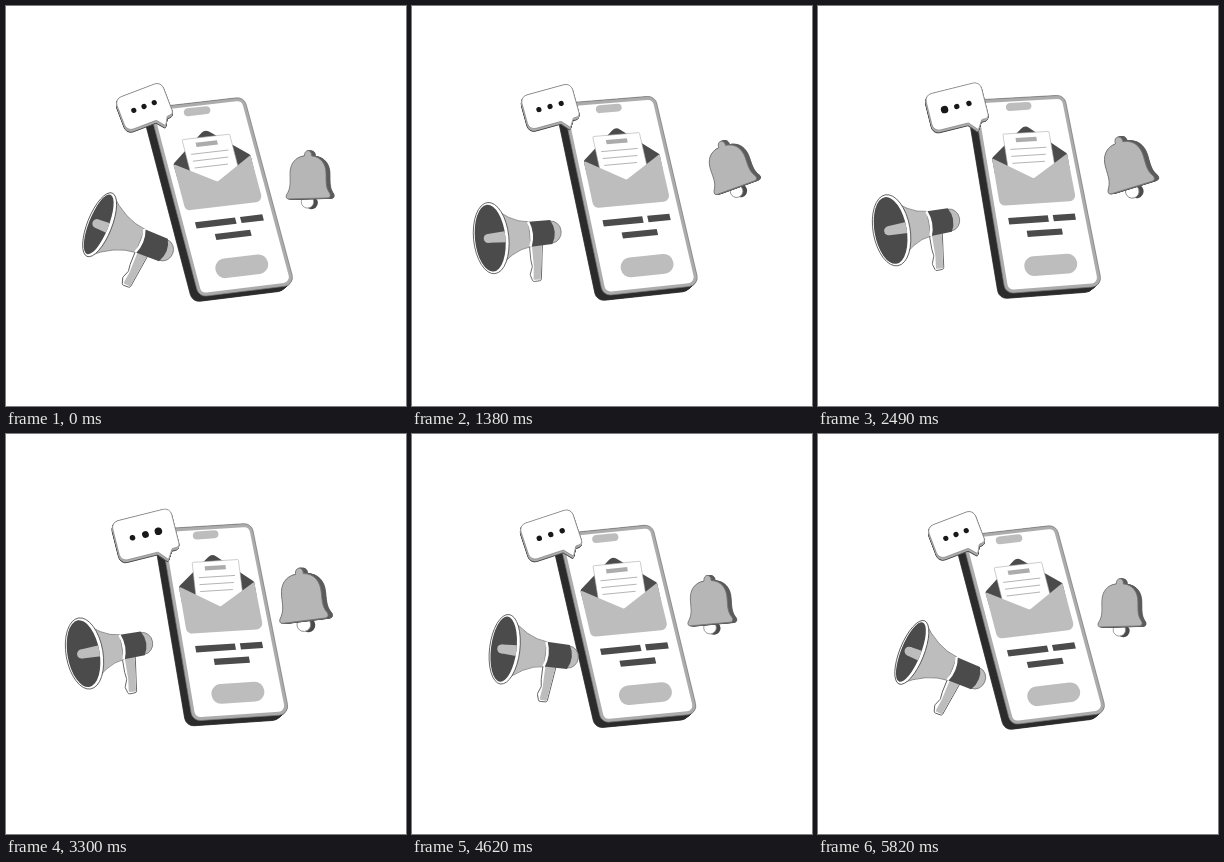
An HTML page with a canvas that plays this animation: 400 by 400 pixels, repeating every 5.85 s.

```html
<!DOCTYPE html>
<html lang="en">
<head>
<meta charset="utf-8">
<title>Notifications</title>
<style>
  html, body { margin: 0; width: 100%; height: 100%; overflow: hidden; background: #fff; }
  canvas { display: block; width: 400px; height: 400px; }
</style>
</head>
<body>
<canvas id="stage"></canvas>
<script>
const LOOP = 5850, TAU = Math.PI * 2, RAD = Math.PI / 180;
const INK = '#2c2c2c', DARK = '#4b4b4b', GREY = '#bdbdbd', MID = '#acacac';
const EDGE = '#4a4a4a', SOFT = '#777';

const canvas = document.getElementById('stage');
const ctx = canvas.getContext('2d');
const dpr = window.devicePixelRatio || 1;
canvas.width = canvas.height = 400 * dpr;

// wave: -1..1 and swell: 0..1, both highest at the peak time
const wave = (t, peak, n = 1) => Math.cos(TAU * n * (t - peak) / LOOP);
const swell = (t, peak, power = 1) => ((1 + wave(t, peak)) / 2) ** power;
const smooth = (t, a, b) => {
  const s = Math.min(1, Math.max(0, (t - a) / (b - a)));
  return s * s * (3 - 2 * s);
};

// Maps u, v in 0..1 onto a four-cornered plane
const plane = ([tl, tr, br, bl]) => (u, v) => [0, 1].map(k =>
  (tl[k] * (1 - u) + tr[k] * u) * (1 - v) + (bl[k] * (1 - u) + br[k] * u) * v);

function rounded(pts, r = 0) {
  const n = pts.length, last = pts[n - 1], first = pts[0];
  ctx.beginPath();
  ctx.moveTo((last[0] + first[0]) / 2, (last[1] + first[1]) / 2);
  pts.forEach((p, i) => ctx.arcTo(...p, ...pts[(i + 1) % n], Array.isArray(r) ? r[i] : r));
  ctx.closePath();
}

function paint(fill, line, width = 0.8) {
  if (fill) { ctx.fillStyle = fill; ctx.fill(); }
  if (line) { ctx.strokeStyle = line; ctx.lineWidth = width; ctx.stroke(); }
}

function oval(x, y, rx, ry, fill, line) {
  ctx.beginPath();
  ctx.ellipse(x, y, rx, ry, 0, 0, TAU);
  paint(fill, line);
}

function extrude(dx, dy, outline, fill, line) {
  for (let i = 8; i > 0; i--) {
    ctx.save();
    ctx.translate(dx * i / 8, dy * i / 8);
    outline();
    paint(fill, line);
    ctx.restore();
  }
}

// Runs a drawing in its own moved, turned and scaled frame
function within(x, y, deg, scale, drawing) {
  ctx.save();
  ctx.translate(x, y);
  ctx.rotate(deg * RAD);
  ctx.scale(scale, scale);
  drawing();
  ctx.restore();
}

function drawPhone(t) {
  const top = swell(t, 2675), foot = swell(t, 3225);
  const at = plane([
    [143 + 12.5 * top, 102 - 8 * top], [238 + 8.5 * top, 91 - 2 * top],
    [289 - 5.5 * foot, 279 + 1.5 * foot], [193 - 6.5 * foot, 291 - 4 * foot]
  ]);
  const box = (u0, v0, u1, v1) => [at(u0, v0), at(u1, v0), at(u1, v1), at(u0, v1)];
  const bar = (u0, v0, u1, v1, fill, r = 0) => { rounded(box(u0, v0, u1, v1), r); paint(fill); };
  const body = () => rounded(box(0, 0, 1, 1), 9);

  extrude(-6.5, 5.3, body, INK, INK);
  body();
  paint(MID, SOFT, 0.7);
  bar(0.036, 0.018, 0.964, 0.982, '#fff', 6);
  bar(0.34, 0.025, 0.62, 0.066, GREY, 3.9);

  // Open envelope; the letter leans out of it
  rounded([at(0.095, 0.303), at(0.51, 0.143), at(0.905, 0.303), at(0.9, 0.4), at(0.1, 0.4)], [3, 6, 3, 2, 2]);
  paint(DARK);
  const lean = 0.05 * swell(t, 4000, 2);
  const page = (u, v) => at(u + lean * (0.42 - v) / 0.24, v);
  rounded([page(0.245, 0.183), page(0.745, 0.183), at(0.745, 0.46), at(0.245, 0.46)], 1);
  paint('#fff', MID, 0.6);
  rounded([page(0.375, 0.207), page(0.6, 0.207), page(0.6, 0.229), page(0.375, 0.229)]);
  paint(MID);
  for (let i = 0; i < 3; i++) {
    const v = 0.264 + 0.036 * i;
    ctx.beginPath();
    ctx.moveTo(...page(0.3, v));
    ctx.lineTo(...page(0.69 - 0.02 * i, v));
    paint(null, MID, 0.9);
  }
  rounded([at(0.095, 0.303), at(0.5, 0.42), at(0.905, 0.303), at(0.905, 0.55), at(0.095, 0.55)], [1, 2, 1, 6, 6]);
  paint(GREY);

  bar(0.159, 0.615, 0.578, 0.648, DARK);
  bar(0.63, 0.615, 0.863, 0.648, DARK);
  bar(0.329, 0.687, 0.698, 0.719, DARK);
  bar(0.24, 0.819, 0.79, 0.921, GREY, 9.6);
}

function drawBubble(t) {
  const level = Math.sin(swell(t, 2675) * Math.PI / 2), grow = swell(t, 3550, 2);
  const x = (49.5 + 3.5 * level + 8 * grow) / 2, y = (34.5 + 6 * grow) / 2;
  const shape = () => rounded([
    [-x, -y], [x, -y], [x, y], [x * 0.74, y], [x * 0.54, y * 1.48], [x * 0.26, y], [-x, y]
  ], [7, 7, 4, 1, 1, 1, 7]);
  within(138 + 1.5 * grow, 100.5, 7 * level - 21, 1, () => {
    extrude(-1.2, 2.6, shape, MID, EDGE);
    extrude(-0.9, 2, shape, MID);
    shape();
    paint('#fff', '#858585', 0.7);
    for (let i = 0; i < 3; i++) {
      const near = Math.max(0, 1 - Math.abs(t - 2600 - 425 * i) / 450);
      const r = 2.6 + 0.2 * grow + 1.1 * Math.sin(near * Math.PI / 2);
      oval((i - 1) * x * 0.44, 0, r, r, '#181818');
    }
  });
}

function drawGrip() {
  rounded([[6.5, -4], [4.8, 35], [-3.5, 36], [-6.3, 29], [-4, 21], [-5.5, 14], [-7, -4]], 2);
  paint('#fff', EDGE);
  rounded([[6, -4], [4.2, 34], [-3, 34], [-2.5, 21], [-4.5, -4]], 1);
  paint(GREY);
}

function drawHorn(t) {
  const turn = swell(t, 5600, 2.3), half = 12.5;
  const a = 36 - 2 * turn, b = 18.5 - 6.5 * turn;
  const neck = 38 + 6 * turn, end = neck + 21 + 4 * turn;
  const x = 84.5 + 11 * wave(t, 5300);
  const y = 222 + 8 * wave(t, 1600) + 2.5 * wave(t, 1200, 2);

  // The barrel runs along x from the mouth
  within(x, y, 33 * turn - 10, 1, () => {
    within(43 + 7 * turn, 12, 5, 1, drawGrip);
    oval(end, 0, 10, 11, GREY, SOFT);

    ctx.beginPath();
    ctx.moveTo(0, -a);
    ctx.quadraticCurveTo(neck / 2, -half * 1.1, neck, -half);
    ctx.lineTo(neck, half);
    ctx.quadraticCurveTo(neck / 2, half * 1.1, 0, a);
    paint(GREY, SOFT, 0.7);

    ctx.beginPath();
    ctx.moveTo(neck, -half);
    ctx.lineTo(end, 0.5 - half);
    ctx.quadraticCurveTo(end + 7, 0, end, half - 0.5);
    ctx.lineTo(neck, half);
    ctx.quadraticCurveTo(neck + 5, 0, neck, -half);
    paint(DARK);
    ctx.beginPath();
    ctx.moveTo(neck - 0.5, -half);
    ctx.quadraticCurveTo(neck + 4.5, 0, neck - 0.5, half);
    paint(null, '#fff', 2.4);

    oval(0, 0, b, a, '#fff', EDGE);
    oval(-1, 0, b - 2.4, a - 2.2, DARK);
    ctx.clip();
    oval(-3, 0, 4.5, 4.5, GREY);
    rounded([[-3, -4.5], [23, -6], [23, 6], [-3, 4.5]]);
    paint(GREY);
  });
}

function bellShape() {
  ctx.beginPath();
  ctx.moveTo(-3.5, -41);
  ctx.bezierCurveTo(-4, -48, 4, -48, 3.5, -41);
  ctx.bezierCurveTo(13, -40, 18, -33, 18, -23);
  ctx.bezierCurveTo(18, -12, 18, -9, 22, -3);
  ctx.quadraticCurveTo(23, 1, 19, 1);
  ctx.lineTo(-19, 2);
  ctx.quadraticCurveTo(-23, 2, -21.5, -2);
  ctx.bezierCurveTo(-17, -9, -18, -14, -18, -23);
  ctx.bezierCurveTo(-18, -33, -13, -40, -3.5, -41);
  ctx.closePath();
}

function drawBell(t) {
  const ringing = smooth(t, 500, 1300) * (1 - smooth(t, 4000, 5600));
  const swing = ringing * (12 + 6.5 * Math.cos(TAU * (t - 1400) / 1290));
  const x = 297.5 + 6.5 * wave(t, 750) + 1.13 * swing;
  const y = 191 - 4 * swell(t, 2600) - 0.45 * swing;
  within(x, y, -swing, 1 + 0.11 * swell(t, 3000, 2), () => {
    oval(3.5, 6, 6.3, 6.3, DARK);
    oval(-0.5, 5, 6.2, 6.2, '#fff', '#888');
    extrude(4, 0.5, bellShape, '#5c5c5c', '#5c5c5c');
    bellShape();
    paint('#b6b6b6', SOFT);
  });
}

function draw(t) {
  ctx.setTransform(dpr, 0, 0, dpr, 0, 0);
  ctx.fillStyle = '#fff';
  ctx.fillRect(0, 0, 400, 400);
  drawPhone(t);
  drawBubble(t);
  drawHorn(t);
  drawBell(t);
}

const start = performance.now();
function tick() {
  draw((performance.now() - start) % LOOP);
  requestAnimationFrame(tick);
}
tick();
</script>
</body>
</html>
```
